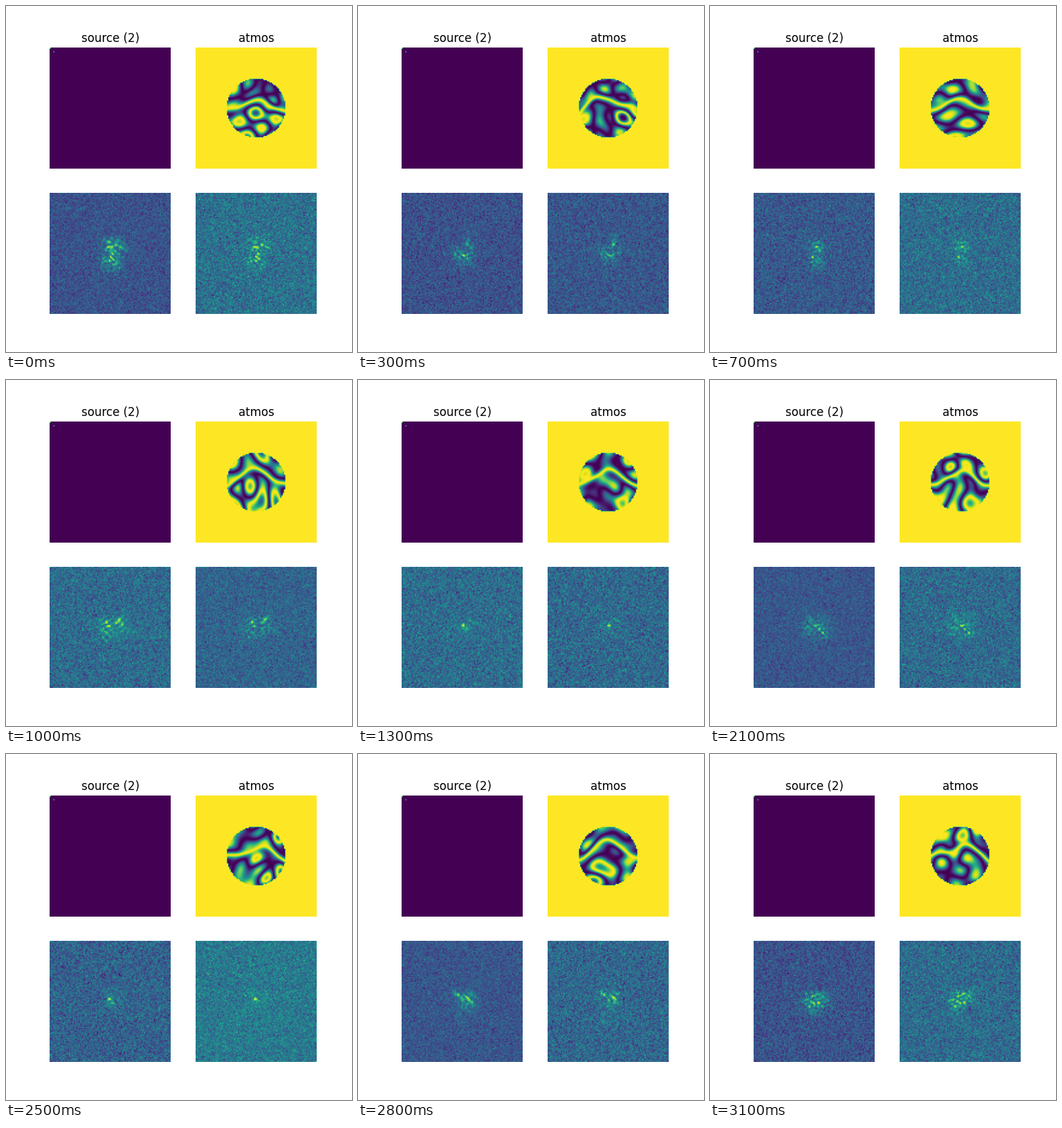
Animation, 500 px wide and 500 px high, one loop 3.2 s. Source, as a matplotlib script:

```python
import numpy as np
import matplotlib.pyplot as plt
from matplotlib.animation import FuncAnimation

N = 100                 # grid cells per panel side
RADIUS = 24.3           # pupil radius in cells
COMPANION = 0.5         # brightness of the second star
SHIFT = (3, 3)          # its offset in cells
FRAMES = 32
INTERVAL = 100

row, col = np.mgrid[:N, :N]
mid = (N - 1) / 2
pupil = np.hypot(col - mid, row - mid) < RADIUS
# pupil coordinates, -1 to 1, y pointing down
px = (col[pupil] - mid) / RADIUS
py = (row[pupil] - mid) / RADIUS


def waves(rng, shortest, longest, count=24):
    """Smooth random surface over the pupil with deviation near 1."""
    total = np.zeros_like(px)
    for _ in range(count):
        angle, offset = rng.uniform(0, 2 * np.pi, 2)
        k = 2 * np.pi / rng.uniform(shortest, longest)
        total += np.cos(k * (px * np.cos(angle) + py * np.sin(angle)) + offset)
    return total * np.sqrt(2 / count)


def wavefront(rng):
    """Phase that crosses zero along an arched ridge, rippled on both sides."""
    bend = rng.normal(0, 0.08)
    sway = 0.1 * np.sin(4.5 * px + rng.uniform(0, 2 * np.pi))
    ridge = 0.08 - (0.4 + bend) * np.cos(np.pi * px / 2) + sway
    side = np.tanh((ridge - py) / 0.2)
    ripple = waves(rng, 0.6, 1.4)
    return np.pi * (1.15 * side + 0.6 * ripple * (0.3 + 0.7 * side ** 2))


def speckles(phase):
    """Point image through the pupil, centred on the panel."""
    field = np.zeros((N, N), complex)
    field[pupil] = np.exp(1j * phase)
    psf = np.abs(np.fft.fftshift(np.fft.fft2(field))) ** 2
    dy = round(48.5 - (psf * row).sum() / psf.sum())
    dx = round(50.5 - (psf * col).sum() / psf.sum())
    return np.roll(psf, (dy, dx), (0, 1))


def expose(light, grain, rng):
    """Add sensor noise and stretch the result to 0..1."""
    shot = light / light.max() + rng.normal(0, grain, (N, N))
    return (shot - shot.min()) / np.ptp(shot)


def render(i):
    rng = np.random.default_rng(40 + i)
    phase = wavefront(rng)
    atmos = np.ones((N, N))
    atmos[pupil] = np.cos(phase)
    single = speckles(phase)
    double = single + COMPANION * np.roll(single, SHIFT, (0, 1))
    return (atmos,
            expose(double, rng.uniform(0.09, 0.15), rng),
            expose(single, rng.uniform(0.13, 0.17), rng))


source = np.zeros((N, N))
source[0, 0] = 1
source[SHIFT] = COMPANION

fig, axes = plt.subplots(2, 2, figsize=(5, 5), dpi=100)
for ax in axes.flat:
    ax.axis("off")
axes[0, 0].set_title("source (2)")
axes[0, 1].set_title("atmos")
axes[0, 0].imshow(source, vmin=0, vmax=1)

shots = [render(i) for i in range(FRAMES)]
views = [ax.imshow(shot, vmin=low, vmax=1)
         for ax, shot, low in zip(axes.flat[1:], shots[0], (-1, 0, 0))]


def update(i):
    for view, shot in zip(views, shots[i]):
        view.set_data(shot)
    return views


anim = FuncAnimation(fig, update, frames=FRAMES, interval=INTERVAL,
                     repeat=True, repeat_delay=0, blit=False)
plt.show()
```
